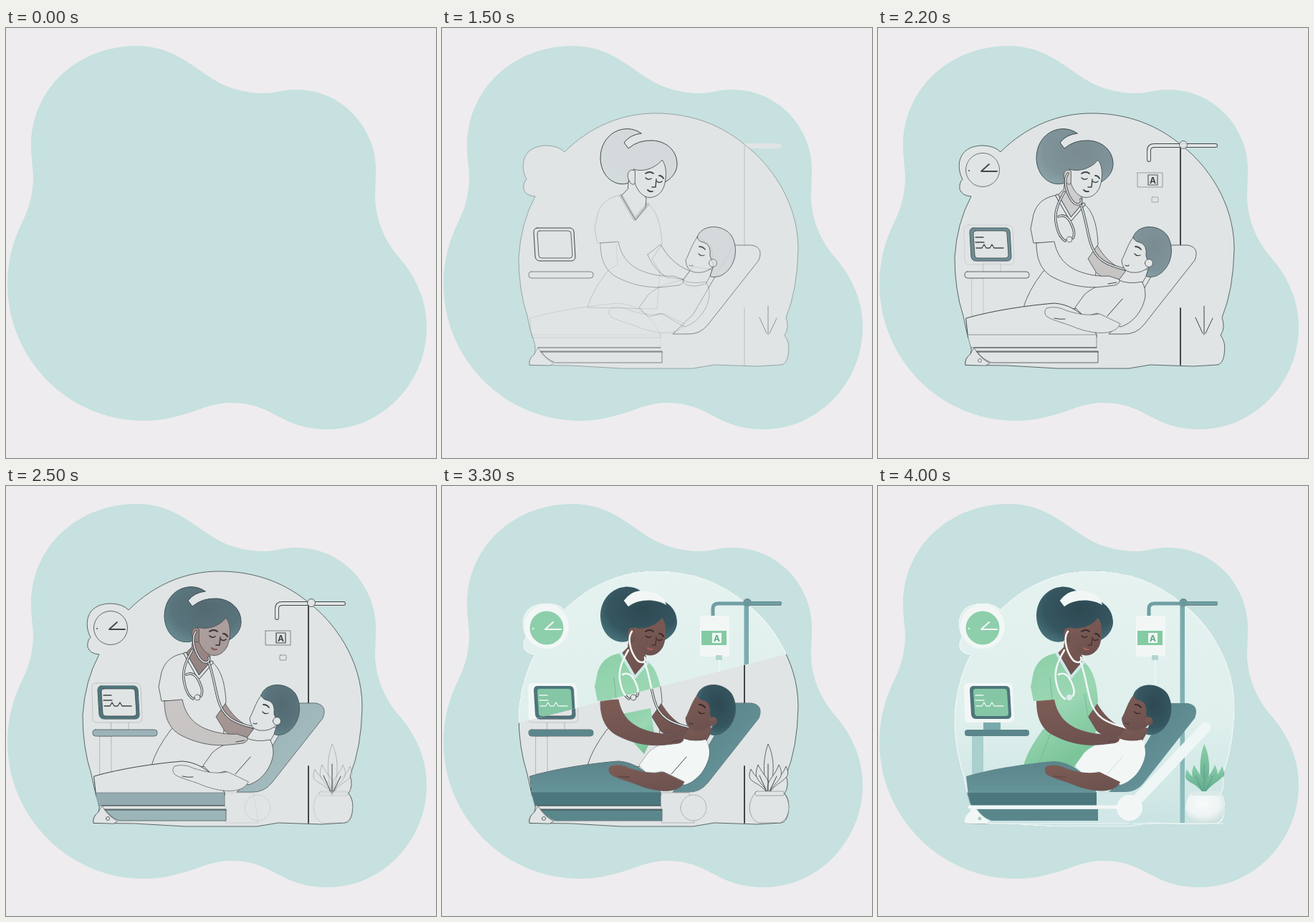
Write an HTML page that moves like this. It is 600 px wide and 600 px high and loops after 7 s.

```html
<!DOCTYPE html>
<html lang="en">
<head>
<meta charset="utf-8">
<title>Bedside care</title>
<style>
@property --n { syntax: "<number>"; inherits: true; initial-value: 0; }
@keyframes tick { to { --n: 70; } }
html, body { margin: 0; width: 100%; height: 100%; overflow: hidden; background: #eeecee; }
#stage { position: relative; width: 600px; height: 600px; overflow: hidden; animation: tick 7s steps(70, end) -1ms infinite; }
svg { position: absolute; left: 0; top: 0; overflow: hidden; }
/* --a: first tick, --d: ticks until solid */
.in { opacity: clamp(0, (var(--n) - var(--a)) / var(--d), 1); }
#art {
  --y: calc(281px + (var(--n) - 33) * 45px);
  clip-path: polygon(0 0, 600px 0, 600px calc(var(--y) - 77px), 0 calc(var(--y) + 77px));
}
path { stroke-linecap: round; stroke-linejoin: round; }
text { font: bold 12px Inter, Arial, sans-serif; text-anchor: middle; }
</style>
</head>
<body>
<div id="stage">
  <svg width="600" height="600">
    <defs>
      <linearGradient id="room" x2="0" y2="1"><stop stop-color="#e5f2f0"/><stop offset=".6" stop-color="#deefec"/><stop offset="1" stop-color="#c9e3e2"/></linearGradient>
      <radialGradient id="hair" cx=".55" cy=".4" r=".65"><stop stop-color="#2e4851"/><stop offset=".7" stop-color="#355660"/><stop offset="1" stop-color="#48717a"/></radialGradient>
      <linearGradient id="green" x2=".4" y2="1"><stop stop-color="#8bcfa7"/><stop offset=".55" stop-color="#9bd7b3"/><stop offset="1" stop-color="#7cc59b"/></linearGradient>
      <linearGradient id="skin" x2=".3" y2="1"><stop stop-color="#7e5c55"/><stop offset="1" stop-color="#6e524f"/></linearGradient>
      <linearGradient id="quilt" x2="0" y2="1"><stop stop-color="#5b858b"/><stop offset="1" stop-color="#66959a"/></linearGradient>
      <linearGradient id="pad" x2="1" y2="1"><stop stop-color="#4f7a82"/><stop offset="1" stop-color="#6f9da1"/></linearGradient>
      <linearGradient id="pole" x2="0" y2="1"><stop stop-color="#78a8aa"/><stop offset="1" stop-color="#8dbcbd"/></linearGradient>
      <linearGradient id="leaf" x2="0" y2="1"><stop stop-color="#8acfaa"/><stop offset="1" stop-color="#5ca58a"/></linearGradient>
      <radialGradient id="pot" cx=".45" cy=".35" r=".7"><stop stop-color="#f8fbfa"/><stop offset=".6" stop-color="#edf4f3"/><stop offset="1" stop-color="#c9dedd"/></radialGradient>
    </defs>
    <path fill="#c6e1df" d="M182 25C225 25 250 45 279 65C305 84 335 92 365 91C380 90 385 86 405 86C470 86 516 140 516 198C516 215 515 225 515 238C516 270 530 300 550 322C572 348 587 380 587 417C587 495 525 560 448 560C405 560 385 543 360 532C345 526 332 523 315 523C285 523 270 534 245 540C228 545 212 548 193 548C85 548 2 460 2 357C2 325 10 296 24 268C33 249 38 230 38 207C37 190 35 180 35 165C35 85 100 25 182 25Z"/>
  </svg>
  <svg id="sketch" width="600" height="600"></svg>
  <svg id="art" width="600" height="600"></svg>
</div>
<script>
const paper = '#e0e4e5', ink = '#3f4648', white = '#f2f7f6', brown = 'url(#skin)', dark = '#38282b';
let sketch = '', art = '';

const fade = (a, d) => `class="in" style="--a:${a};--d:${d}"`;
const fillOf = (d, c) => `<path d="${d}" fill="${c}"`;
const lineOf = (d, c, w) => `<path d="${d}" fill="none" stroke="${c}" stroke-width="${w}"`;

// A filled part: outlined from tick `at`, tinted from tick `tint`, coloured by the sweep
function area(d, color, at, tint, w = .8, slow = 6) {
  art += fillOf(d, color) + '/>';
  if (at) sketch += `${fillOf(d, paper)} stroke="${ink}" stroke-width="${w}" ${fade(at, 8)}/>`;
  if (tint) sketch += `${fillOf(d, color)} ${fade(tint, slow)}/>`;
}

// A stroked part: thin ones become ink, thick ones a pair of ink edges
function line(d, color, w, at, tint) {
  art += lineOf(d, color, w) + '/>';
  if (at) {
    sketch += `${lineOf(d, ink, w > 2.5 ? w + .8 : Math.min(w, 1.8))} ${fade(at, 6)}/>`;
    if (w > 2.5) sketch += `${lineOf(d, paper, w - 1)} ${fade(at, 6)}/>`;
  }
  if (tint) sketch += `${lineOf(d, color, w)} ${fade(tint, 5)}/>`;
}

const disc = (x, y, r) => `M${x - r} ${y}a${r} ${r} 0 1 1 ${2 * r} 0a${r} ${r} 0 1 1 ${-2 * r} 0Z`;
const box = (x, y, w, h, r = 0) =>
  `M${x + r} ${y}h${w - 2 * r}q${r} 0 ${r} ${r}v${h - 2 * r}q0 ${r} ${-r} ${r}h${2 * r - w}q${-r} 0 ${-r} ${-r}v${2 * r - h}q0 ${-r} ${r} ${-r}Z`;

// Room
const room = 'M122 470Q120 462 129 455Q133 444 124 425L119 402Q107 365 107 320Q110 272 130 235Q117 234 114 225Q113 216 118 211C109 195 110 165 145 164Q162 164 171 173C208 136 253 119 298 119C350 119 393 137 425 165C455 188 497 240 497 308Q496 365 480 404Q485 418 478 429Q486 438 483 456Q481 469 473 470L440 472L380 470L350 475H250L180 471Z';
sketch += `<g ${fade(0, 6)}>${fillOf(room + box(422, 161, 51, 7, 3), paper)}/></g>`;
sketch += `${lineOf(room, ink, .8)} ${fade(9, 12)}/>`;
art += `${fillOf(room, 'url(#room)')} stroke="#edf6f5" stroke-width="1.6"/>`;

// Clock
area(disc(146, 196, 31), white);
area(disc(146, 198, 23.5), '#8ecfab', 15);
line('M155 190L144 200H166', white, 2.2, 16);
line('M127 199h.1', white, 2.4, 16);

// Monitor and shelf
area('M131 349H147V402H131Z', '#a9cfce', 17, 0, .3);
area('M147 328H171V341H147Z', '#79a9ac', 17, 0, .3);
area('M126 275H181Q187 275 188 281L190 323Q190 330 184 330H127Q121 330 121 324L120 281Q120 275 126 275Z', white, 17, 0, .2);
area('M133 279H178Q183 279 184 284L186 319Q186 325 180 325H137Q131 325 130 319L128 285Q128 279 133 279Z', '#4e757c', 2, 15, 1, 9);
area('M136 283H176Q180 283 180 287L182 317Q182 321 178 321H139Q135 321 135 317L133 287Q133 283 136 283Z', '#85c7a5', 2);
line('M136 292h11M136 299h12M137 307h8l3-5 3 5h5l3-5 3 5h13', '#e8f5ee', 1.3, 16);
area(box(121, 340, 90, 9, 4), '#5b868b', 9, 22);

// Drip stand
area(box(421.5, 163, 6.5, 307), 'url(#pole)');
sketch += `${lineOf('M422 165V304M422 391V470', ink, 2)} ${fade(14, 8)}/>`;
line('M378 184V171Q378 164 386 164H471', '#6f9fa2', 5, 15, 28);
area(disc(426, 163, 5.5), '#6b989c', 15, 28);
area(box(360, 181, 41, 57, 4), white);
area(box(362, 202, 35, 20), '#83cba3', 16, 29, .6);
area(box(377, 205, 13, 14), white, 15, 0, 1.2);
const letter = '<text x="383.5" y="216.5"';
art += letter + ' fill="#5faa84">A</text>';
sketch += `${letter} fill="${ink}" ${fade(18, 4)}>A</text>`;
area(box(382, 236, 9, 7, 1), '#b3d5d2', 16, 0, .5);
line('M387 243V282', white, 1.6);

// Plant
const leaf = (x, y, bend) => `M455 430C${448 + bend} 408 ${x - 8} ${y + 22} ${x} ${y}C${x + 10} ${y + 20} ${464 + bend} 408 455 430Z`;
[[431, 395, -8], [480, 391, 6], [455, 360, 0], [441, 389, -4], [470, 389, 3]].forEach(([x, y, b]) =>
  area(leaf(x, y, b), 'url(#leaf)', 22));
line('M455 428L455 388M453 426L443 404M457 426L467 405', '#5ba187', 1, 12);
area('M437 428H476Q484 436 484 449Q483 465 472 470H441Q430 465 429 449Q430 436 437 428Z', 'url(#pot)', 22, 0, .4);
area(box(437, 426, 40, 6, 2), '#dbeae8', 22, 0, .4);

// Nurse: far arm, hair, neck
area('M287 316L305 302C314 318 327 332 346 339L338 351L314 348C302 341 293 331 287 316Z', brown, 10, 20, .8, 9);
area('M278 147C256 131 221 146 221 182C222 207 240 221 258 217L270 208L300 219C318 215 328 202 328 190C328 171 313 158 294 157Q274 156 260 168L254 160Q262 149 278 147Z', 'url(#hair)', 1, 14, 1, 14);
area('M254 160Q264 146 279 146C297 147 310 152 313 166C298 157 275 157 260 168Z', white);
area('M262 200L278 225L285 238L284 251L270 268L250 234L259 225Z', brown, 7, 21);

// Uniform
area('M250 233C232 236 222 244 217 260L213 280L217 300L243 299L245 330L230 340Q209 368 203 390L300 392L304 340L293 322L307 302C306 278 301 256 287 245L270 267Z', 'url(#green)', 13, 0, .8);
sketch += `${fillOf('M251 318L291 310L296 345L282 374L262 352Z', 'url(#green)')} ${fade(29, 4)}/>`;
art += `${lineOf('M243 299L240 268M293 322L288 290M240 347L224 388', '#79bd98', 1.2)}/>`;
line('M250 234L269 267L287 246', '#cfe7e8', 4, 14);

// Face
area('M268 197C280 202 299 195 307 184C315 194 313 213 309 223C304 234 294 238 286 236C277 233 272 225 268 214Z', brown, 2, 22);
area('M269 199C260 195 257 205 261 213Q265 221 269 217Z', brown, 3, 21);
line('M284 203Q290 199 295 203M303 206Q307 206 309 210', dark, 2, 2, 22);
line('M284 209Q288 213 292 210M300 214Q303 217 307 214', dark, 1.5, 2, 22);
line('M299 211L298 222L293 222', '#4c3234', 1.5, 2, 22);
line('M287 226Q290 229 294 228', '#b6605c', 1.8, 2, 22);

// Stethoscope
line('M265 203C258 212 263 230 270 240C276 249 286 247 283 239M283 247C289 262 291 280 296 298C303 324 320 331 346 337', white, 2.6, 15);
line('M260 229C253 241 246 255 248 270C250 283 254 293 261 297M252 263Q263 258 270 274Q276 287 272 293', white, 2.6, 15);
area(disc(267, 295, 4), '#dcecec', 15);

// Bed back
area('M407 303H432Q449 306 442 324L371 414Q360 428 342 427H322L350 400Z', 'url(#pad)', 9, 22);

// Patient
area('M350 333L335 353Q343 365 368 357L379 338Z', brown, 10, 26);
area('M336 352C319 354 300 361 288 372L275 390L288 403L306 398L338 417C356 412 370 394 373 374Q373 360 368 354Q350 358 336 352Z', white, 12, 25);
line('M341 378L320 402', '#c9dbdb', 1, 15);
area('M357 291C349 300 346 313 340 324Q341 339 353 341Q369 343 379 332L376 305Z', brown, 9, 27);
area('M356 292C362 273 392 273 404 290C416 311 407 338 388 346Q378 349 374 346L379 331L374 318Q376 302 365 299Q358 298 356 292Z', 'url(#hair)', 8, 14, .9, 14);
area(disc(378, 328, 5.5), brown, 9, 27);
line('M359 305Q364 305 367 309', dark, 2, 10, 28);
line('M358 315Q361 319 366 317', dark, 1.3, 10, 28);
line('M345 331Q348 333 350 331', '#50373a', 1.1, 12, 28);

// Nurse: near arm
area('M221 300L246 298C250 318 260 331 279 339C294 345 310 347 322 346L337 351Q338 357 330 359L313 361C288 364 262 358 241 346C226 336 221 320 221 300Z', brown, 11, 23, .8, 9);
line('M321 357L333 355', '#5d4142', 1, 15, 25);

// Quilt and bed
area('M305 428H345L352 470H307Z', '#d2e7e7', 22, 0, .3);
area('M123 405C160 394 210 387 246 384C274 386 294 405 305 428V432H126Z', 'url(#quilt)', 14, 27, 1);
area('M125 428H305V446H130Z', '#4b777e', 14, 22, .5);
area('M138 451H307V467H158Q145 462 138 451Z', '#5a878c', 9, 22);
area('M338 413C331 429 304 428 278 419C262 412 246 409 236 403Q230 397 235 391Q249 387 262 394C278 399 292 402 309 399Z', brown, 13, 26, .6);
line('M246 405Q254 407 261 406', '#5d4142', 1, 15, 27);
line('M457 337L354 446', '#eff6f6', 15);
line('M128 448H345', white, 5);
sketch += `${lineOf('M134 446H305M138 452H307', ink, 1)} ${fade(9, 8)}/>`;
area(disc(351, 449, 18), white, 22, 0, .3);
area('M122 470Q121 461 129 455L134 446Q141 460 156 468L150 471Z', white, 11, 0, .6);
area(disc(142, 464, 2.5), '#a9cbca', 16);
line('M158 471H350M356 471H482', '#e5f1f0', 1.4);

document.getElementById('sketch').innerHTML = sketch;
document.getElementById('art').innerHTML = art;
</script>
</body>
</html>
```
